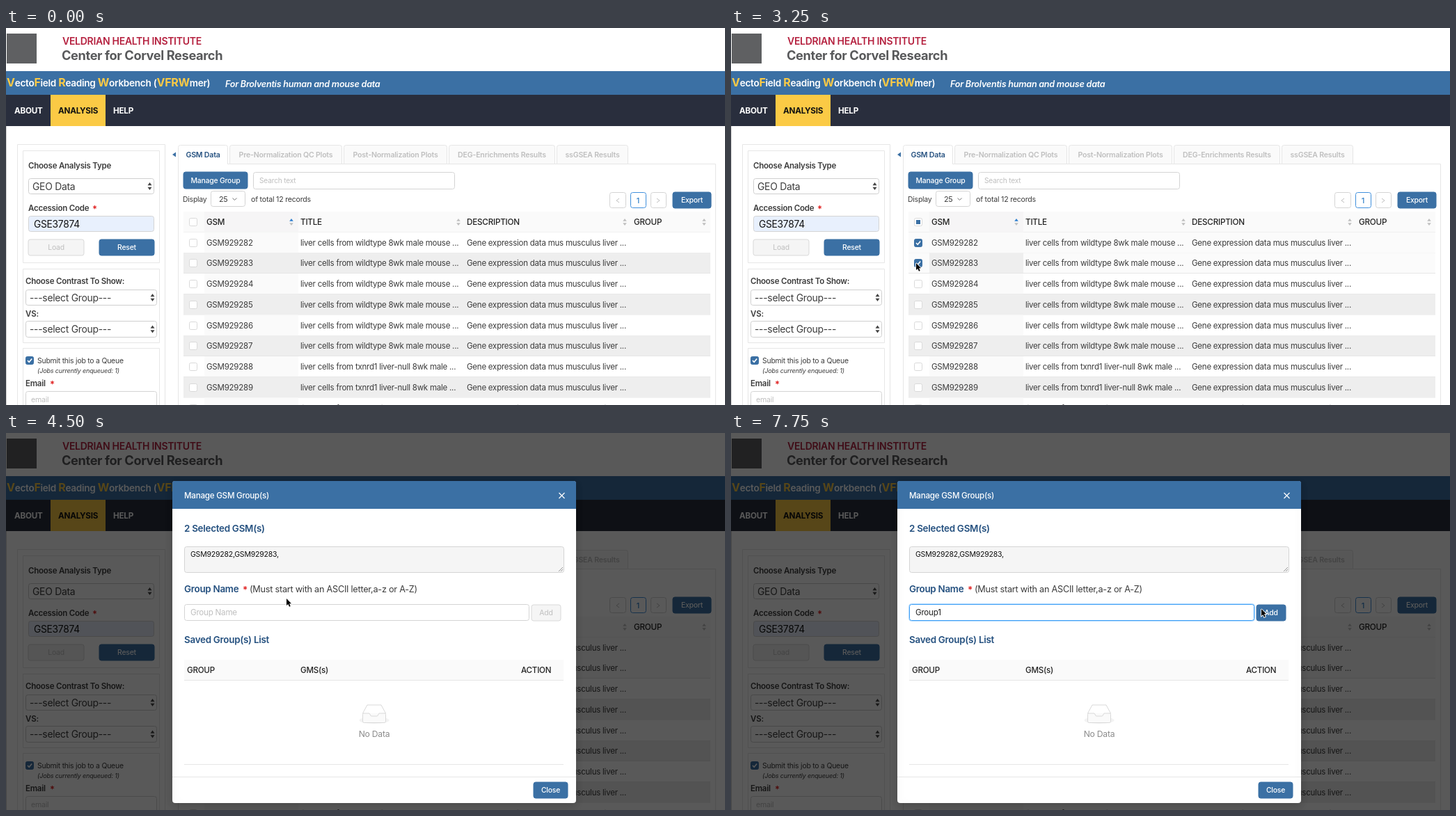
These frames come from a looping animation (1033x542 px, 8 s). An HTML page with a canvas:

```html
<!DOCTYPE html>
<html lang="en">
<head>
<meta charset="utf-8">
<title>Manage group</title>
<style>
html, body { margin: 0; width: 100%; height: 100%; overflow: hidden; }
canvas { display: block; }
</style>
</head>
<body>
<canvas id="stage" width="1033" height="542"></canvas>
<script>
const ctx = document.getElementById('stage').getContext('2d');
const BLUE = '#3b70a4', NAVY = '#24507f', YELLOW = '#fbca45', INK = '#3c3c3c', PALE = '#bfbfbf', LINE = '#e6e6e6', EDGE = '#d4d4d4';
const LOOP = 8000, STEP = 250;

function text(str, x, y, size, color = INK, weight = 400, align = 'left') {
  ctx.font = `${weight} ${size}px Inter, sans-serif`;
  ctx.letterSpacing = `${-size * 0.02}px`;
  ctx.textAlign = align;
  ctx.fillStyle = color;
  ctx.fillText(str, x, y + size * 0.36);
}

function rect(x, y, w, h, fill) {
  ctx.fillStyle = fill;
  ctx.fillRect(x, y, w, h);
}

function box(x, y, w, h, fill, border = EDGE, radius = 3) {
  ctx.beginPath();
  ctx.roundRect(x + 0.5, y + 0.5, w - 1, h - 1, radius);
  if (fill) { ctx.fillStyle = fill; ctx.fill(); }
  ctx.strokeStyle = border;
  ctx.lineWidth = 1;
  ctx.stroke();
}

function button(label, x, y, w, h, enabled = true) {
  box(x - 0.5, y - 0.5, w + 1, h + 1, enabled ? BLUE : '#f5f5f5', enabled ? BLUE : '#d9d9d9');
  text(label, x + w / 2, y + h / 2, 10.4, enabled ? '#fff' : PALE, enabled ? 500 : 400, 'center');
}

function poly(points, fill) {
  ctx.beginPath();
  for (let i = 0; i < points.length; i += 2) ctx.lineTo(points[i], points[i + 1]);
  ctx.closePath();
  ctx.fillStyle = fill;
  ctx.fill();
}

function stroke(points, color, width = 1) {
  ctx.beginPath();
  for (let i = 0; i < points.length; i += 2) ctx.lineTo(points[i], points[i + 1]);
  ctx.strokeStyle = color;
  ctx.lineWidth = width;
  ctx.stroke();
}

function arrows(x, y, up, down = up, w = 3, gap = 1.2) {
  poly([x - w, y - gap, x + w, y - gap, x, y - gap - w * 1.4], up);
  poly([x - w, y + gap, x + w, y + gap, x, y + gap + w * 1.4], down);
}

function select(label, x, y, w, h) {
  box(x, y, w, h, '#fff', '#cfcfcf');
  text(label, x + 6, y + h / 2, 13.9, INK);
  arrows(x + w - 6.5, y + h / 2, '#444');
}

function checkbox(x, y, state) {
  const on = state === 'on';
  box(x, y, 12, 12, on ? BLUE : '#fff', on ? BLUE : '#d9d9d9', 2);
  if (on) stroke([x + 3, y + 6, x + 5.2, y + 8.3, x + 9.2, y + 3.5], '#fff', 1.6);
  if (state === 'some') rect(x + 3, y + 3, 6, 6, BLUE);
}

function drawHeader() {
  rect(1, 8, 43, 43, '#5f6062');
  text('VELDRIAN HEALTH INSTITUTE', 81, 19, 14, '#b5213f', 600);
  text('Center for Corvel Research', 80, 39, 18.2, '#58595b', 700);
  rect(0, 62, 1033, 34, BLUE);
  let x = 1;
  for (const run of 'VectoField Reading Workbench (VFRWmer)'.match(/[A-Z]+|[^A-Z]+/g)) {
    const caps = /[A-Z]/.test(run);
    text(run, x, caps ? 78.5 : 79.5, caps ? 16 : 13.6, caps ? YELLOW : '#fff', caps ? 700 : 600);
    x += ctx.measureText(run).width;
  }
  text('For Brolventis human and mouse data', 315, 80, 12.6, '#fff', 'italic 600');
  rect(0, 96, 1033, 45, '#292e3d');
  rect(64, 96, 79, 45, YELLOW);
  text('ABOUT', 12, 119, 11.7, '#fff', 700);
  text('ANALYSIS', 75, 119, 11.7, '#111', 700);
  text('HELP', 154, 119, 11.7, '#fff', 700);
  rect(0, 141, 1, 401, '#cfcfcf');
}

function drawSidebar() {
  const label = (str, x, y) => text(str, x, y, 11.5, INK, 600);
  const star = (x, y) => text('*', x, y + 1, 13, '#e02020', 600);
  box(16, 167, 213, 400, null, LINE, 0);
  box(24, 176, 197, 162, null, LINE, 0);
  box(24, 346, 197, 107, null, LINE, 0);
  box(24, 460, 197, 100, null, LINE, 0);
  label('Choose Analysis Type', 32, 198);
  select('GEO Data', 32, 216, 181, 23);
  label('Accession Code', 32, 259);
  star(124, 259);
  box(32, 270, 181, 23, '#e8f0fd');
  text('GSE37874', 40, 282, 13.8, '#111');
  button('Load', 32, 304, 80, 23, false);
  button('Reset', 134, 304, 79, 23);
  label('Choose Contrast To Show:', 28, 364);
  select('---select Group---', 28, 376, 189, 23);
  label('VS:', 28, 411);
  select('---select Group---', 28, 421, 189, 24);
  checkbox(28, 472, 'on');
  text('Submit this job to a Queue', 45, 478, 10.4);
  text('(Jobs currently enqueued: 1)', 45, 493, 9.1, INK, 'italic 400');
  label('Email', 28, 511);
  star(63, 511);
  box(28, 522, 189, 24, '#fff');
  text('email', 36, 534, 10.6, PALE);
}

function drawTabs() {
  poly([244, 178.5, 244, 185.5, 239, 182], BLUE);
  box(247, 195, 773, 400, '#fff', LINE, 0);
  const tabs = [
    ['GSM Data', 247, 72], ['Pre-Normalization QC Plots', 321, 162], ['Post-Normalization Plots', 485, 149],
    ['DEG-Enrichments Results', 636, 153], ['ssGSEA Results', 791, 103]
  ];
  tabs.forEach(([name, x, w], i) => {
    box(x, 168, w, 28, i ? '#fafafa' : '#fff', LINE, [3, 3, 0, 0]);
    text(name, x + w / 2, 182, 10.6, i ? PALE : NAVY, 600, 'center');
  });
  rect(248, 195, 70, 1, '#fff');
}

function drawTable(first, second) {
  button('Manage Group', 255, 207, 92, 24);
  box(355, 207, 290, 25, '#fff');
  text('Search text', 364, 219.5, 10.2, PALE);
  text('Display', 254, 246, 10.4);
  box(294, 234, 50, 23, '#fff');
  text('25', 306, 246, 10.8);
  stroke([325.5, 244.5, 328.5, 247.5, 331.5, 244.5], '#777');
  text('of total 12 records', 352, 246, 10.6);
  box(867, 236, 24, 23, '#fff');
  stroke([881, 245, 877, 248, 881, 251], PALE);
  box(897, 236, 23, 23, '#fff', '#3f8fdc');
  text('1', 908, 248, 11, '#2f7fc8', 500, 'center');
  box(926, 236, 23, 23, '#fff');
  stroke([935, 245, 939, 248, 935, 251], PALE);
  button('Export', 958, 236, 55, 23);

  rect(255, 264, 757, 29, '#fafafa');
  rect(285, 264, 135, 29, '#f6f5f6');
  rect(255, 293, 757, 1, LINE);
  checkbox(263, 273, first && 'some');
  [['GSM', 288, 410], ['TITLE', 423, 650], ['DESCRIPTION', 662, 889], ['GROUP', 902, 1003]].forEach(([name, x, sort], i) => {
    text(name, x, 279, 11.7, '#222', 500);
    arrows(sort, 279, i ? PALE : '#2f7fd0', PALE, 2.8);
  });
  for (let i = 0; i < 9; i++) {
    const y = 293.5 + 29.75 * i, mid = y + 15;
    const checked = [first, second][i];
    rect(255, y, 757, 29.75, checked ? '#fbfbfb' : i % 2 ? '#eeeeee' : '#fff');
    rect(285, y, 135, 29.75, i % 2 ? '#eeeeee' : '#fafafa');
    rect(255, Math.round(y + 29), 757, 1, LINE);
    checkbox(263, Math.round(mid - 6), checked && 'on');
    text(`GSM${929282 + i}`, 288, mid, 11.5);
    text(`liver cells from ${i < 6 ? 'wildtype 8wk male mouse' : 'txnrd1 liver-null 8wk male'} ...`, 423, mid, 11.5);
    text('Gene expression data mus musculus liver ...', 662, mid, 11.5);
  }
}

function drawModal(typed, focused, caret) {
  ctx.save();
  ctx.shadowColor = 'rgba(0,0,0,.15)';
  ctx.shadowBlur = 12;
  ctx.shadowOffsetY = 4;
  box(239, 69, 580, 463, '#fff', '#fff');
  ctx.restore();
  ctx.beginPath();
  ctx.roundRect(239, 69, 580, 40, [3, 3, 0, 0]);
  ctx.fillStyle = BLUE;
  ctx.fill();
  text('Manage GSM Group(s)', 256, 89.5, 11.6, '#fff', 500);
  stroke([794.5, 86, 802.5, 94], '#fff', 1.2);
  stroke([802.5, 86, 794.5, 94], '#fff', 1.2);

  const heading = (str, y) => text(str, 256, y, 13.4, NAVY, 600);
  heading('2 Selected GSM(s)', 137);
  box(256, 163, 546, 38, '#f5f5f5', '#d4d4d4');
  text('GSM929282,GSM929283,', 265, 174.5, 10.5, '#111');
  stroke([794, 199, 800, 193], '#999');
  stroke([797, 199, 800, 196], '#999');
  heading('Group Name', 224);
  text('*', 340, 225, 13.5, '#e02020', 600);
  text('(Must start with an ASCII letter,a-z or A-Z)', 350, 224, 12.7, INK);

  if (focused) box(255, 245, 498, 26, '#b5dcff', '#b5dcff', 4);
  box(256, 246, 496, 24, '#fff', focused ? '#40a0f5' : EDGE);
  text(typed || 'Group Name', 265, 258, 11.6, typed ? '#222' : PALE);
  if (caret) rect(265 + (typed ? ctx.measureText(typed).width : 0), 252, 1, 13, '#222');
  button('Add', 755, 247, 42, 23, !!typed);

  heading('Saved Group(s) List', 297);
  rect(256, 326, 545, 29, '#fafafa');
  rect(256, 355, 545, 1, LINE);
  text('GROUP', 260, 341, 11.6, '#222', 500);
  text('GMS(s)', 423, 341, 11.6, '#222', 500);
  text('ACTION', 740, 341, 11.6, '#222', 500);

  ctx.beginPath();
  ctx.ellipse(529, 413, 21.5, 5, 0, 0, 7);
  ctx.fillStyle = '#f3f3f3';
  ctx.fill();
  box(512, 402, 34, 15, '#fafafa', '#d9d9d9', 2);
  poly([512.5, 403, 519, 391, 539, 391, 545.5, 403], '#fff');
  stroke([512.5, 403, 519, 391, 539, 391, 545.5, 403, 536, 403, 533.5, 407, 524.5, 407, 522, 403, 512.5, 403], '#d9d9d9');
  text('No Data', 529, 433, 12.2, '#8c8c8c', 400, 'center');

  rect(256, 476, 545, 1, LINE);
  rect(239, 494, 580, 1, LINE);
  button('Close', 758, 502, 49, 23);
}

function drawCursor([x, y]) {
  ctx.save();
  ctx.translate(x, y);
  const shape = [0, 0, 0, 10, 2.3, 8, 4, 11.8, 5.7, 11, 4.1, 7.3, 7, 7.3];
  stroke([...shape, 0, 0], '#fff', 1.8);
  poly(shape, '#000');
  ctx.restore();
}

// Pointer stops: time in ms, x, y
const pointer = [
  [500, 368, 224], [750, 334, 253], [1000, 300, 282], [1250, 277, 302], [1500, 267, 309], [1750, 266, 307], [2000, 265, 310],
  [3000, 266, 325], [3250, 266, 338], [3500, 286, 290], [3750, 308, 228], [4000, 310, 220], [4500, 403, 238], [4750, 396, 256],
  [7250, 480, 268], [7500, 690, 260], [7750, 762, 253]
];

function draw(now) {
  const t = Math.floor(now % LOOP / STEP) * STEP;
  rect(0, 0, 1033, 542, '#fff');
  drawHeader();
  drawSidebar();
  drawTabs();
  drawTable(t >= 2750, t >= 3250);

  if (t >= 4250) {
    const opening = t < 4500;
    rect(0, 0, 1033, 542, `rgba(0,0,0,${opening ? 0.25 : 0.65})`);
    const length = t >= 7000 ? 6 : Math.max(0, Math.min(5, (t - 5250) / STEP));
    const focused = t >= 5000;
    ctx.save();
    if (opening) {
      ctx.globalAlpha = 0.92;
      ctx.translate(310, 223);
      ctx.scale(0.917, 0.917);
      ctx.translate(-310, -223);
    }
    drawModal('Group1'.slice(0, length), focused, focused && t < 7500);
    ctx.restore();
  }
  const stop = pointer.findLast(p => p[0] <= t);
  if (stop) drawCursor(stop.slice(1));
  requestAnimationFrame(() => draw(performance.now()));
}
draw(0);
</script>
</body>
</html>
```
